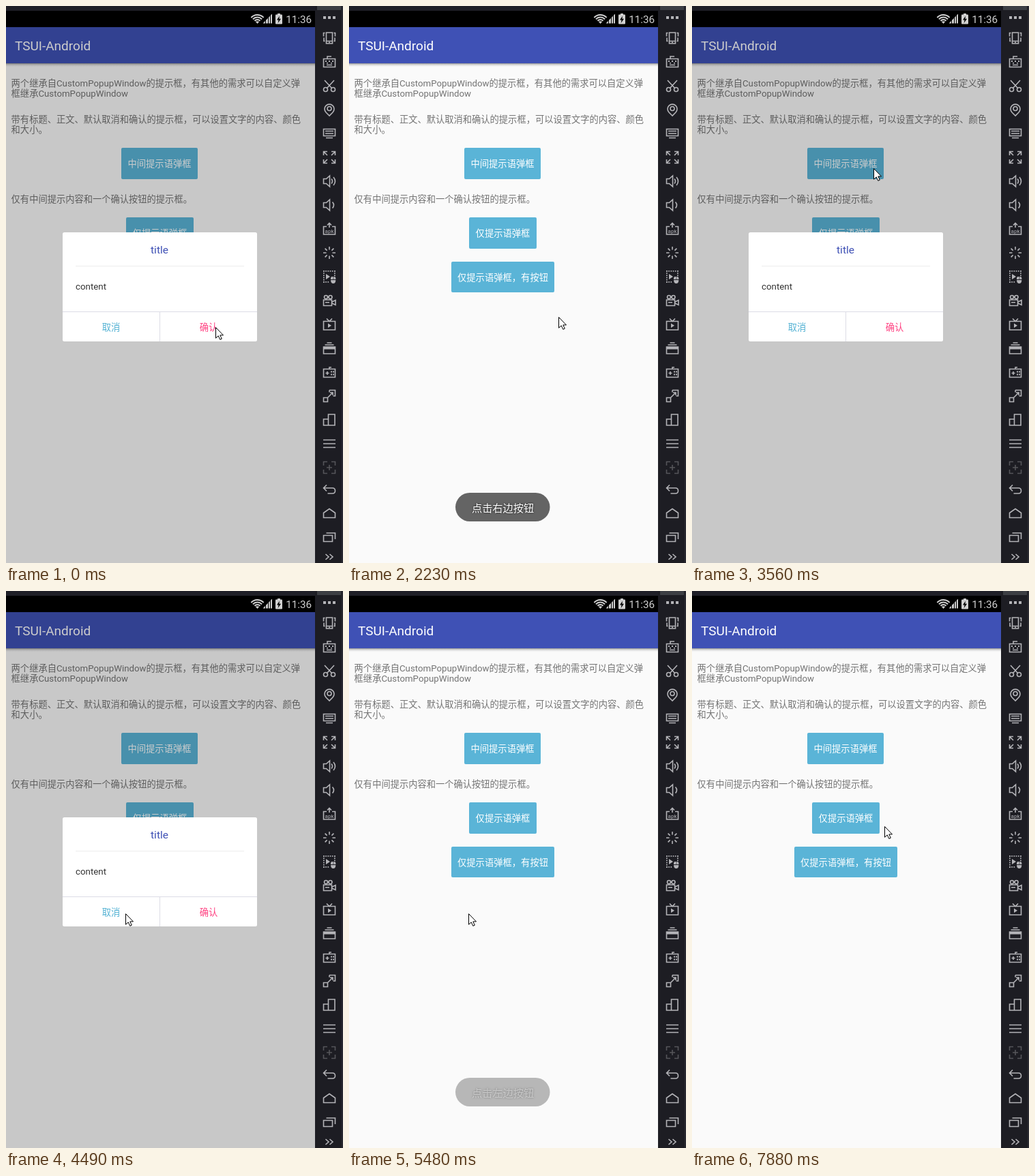
These frames come from a looping animation (494 px wide and 817 px high, 8000 ms). An HTML page with a canvas:

```html
<!DOCTYPE html>
<html lang="zh-CN">
<head>
<meta charset="utf-8">
<style>
html, body { margin: 0; width: 100%; height: 100%; overflow: hidden; background: #1d1d23; }
canvas { display: block; width: 494px; height: 817px; }
</style>
</head>
<body>
<canvas id="stage" width="494" height="817"></canvas>
<script>
const ctx = document.getElementById('stage').getContext('2d');
const LOOP = 8000;
const FONT = 'Roboto, "Noto Sans CJK SC", "Noto Sans CJK", sans-serif';
const ICON = '#b4b4b8';

// time, x, y of the pointer tip; each position holds until the next
const POINTER = [
  [0, 307, 471], [2230, 307, 456], [2350, 311, 400], [2470, 314, 354],
  [2620, 303, 285], [2770, 289, 262], [2890, 275, 246], [3010, 268, 240],
  [3130, 266, 238], [3830, 222, 330], [3950, 185, 404], [4100, 173, 446],
  [4220, 170, 465], [4370, 172, 470], [4490, 175, 473], [6980, 315, 435],
  [7100, 328, 395], [7220, 332, 362], [7370, 328, 356], [7490, 322, 350],
  [7610, 313, 347], [7730, 305, 345], [7880, 282, 345]
];
const DIM = [[0, 1], [910, 0], [3560, 1], [5360, 0]];
const DIALOG = [[0, 1], [910, 0], [3560, 1], [5230, 0]];
const TOASTS = [
  { text: '点击右边按钮', alpha: [[0, 0], [1060, .45], [1180, .82], [1300, 1], [2890, .94], [3010, .76], [3130, .42], [3290, 0]] },
  { text: '点击左边按钮', alpha: [[0, 0], [5480, .45], [5600, .82], [5740, 1], [7370, .94], [7490, .76], [7610, .42], [7730, 0]] }
];

function at(keys, t) {
  let hit = keys[0];
  for (const k of keys) if (k[0] <= t) hit = k;
  return hit;
}

function rect(x, y, w, h, color) {
  ctx.fillStyle = color;
  ctx.fillRect(x, y, w, h);
}

function round(x, y, w, h, r, color) {
  ctx.fillStyle = color;
  ctx.beginPath();
  ctx.roundRect(x, y, w, h, r);
  ctx.fill();
}

function text(s, x, y, size, color, align = 'left') {
  ctx.font = `${size}px ${FONT}`;
  ctx.textAlign = align;
  ctx.fillStyle = color;
  ctx.fillText(s, x, y);
}

function button(s, x, y, w, h) {
  round(x, y, w, h, 2, '#5ab4d7');
  text(s, x + w / 2, y + h / 2 + 5, 13.3, '#fff', 'center');
}

function drawStatusBar() {
  rect(0, 0, 494, 7, '#1f1f27');
  rect(0, 7, 453, 24, '#000');
  const c = '#d0d0d0';
  ctx.fillStyle = c;
  ctx.fill(new Path2D('M377 25.5V25L390 11.5V25.5Z'));
  rect(380, 11, 1, 15, '#000');
  rect(384, 11, 1, 15, '#000');
  rect(387, 11, 1, 15, '#000');
  ctx.strokeStyle = c;
  ctx.lineWidth = 2;
  for (const r of [5.5, 9, 12.5]) {
    ctx.beginPath();
    ctx.arc(368.5, 25.5, r, -Math.PI * .76, -Math.PI * .24);
    ctx.stroke();
  }
  ctx.fillStyle = c;
  ctx.fill(new Path2D('M368.5 26L365.8 23Q368.5 21.4 371.2 23Z'));
  rect(398, 11, 4, 2, c);
  round(395, 12.5, 10, 14, 1, c);
  ctx.fillStyle = '#000';
  ctx.fill(new Path2D('M401 14.5L397 20.5H399.5L398.7 25L403 18.7H400.4Z'));
  text('11:36', 448, 25, 15.2, c, 'right');
}

function drawPage() {
  rect(0, 31, 453, 786, '#fafafa');
  const shade = ctx.createLinearGradient(0, 84, 0, 89);
  shade.addColorStop(0, 'rgba(0,0,0,.42)');
  shade.addColorStop(.4, 'rgba(0,0,0,.14)');
  shade.addColorStop(1, 'rgba(0,0,0,0)');
  rect(0, 84, 453, 5, shade);
  rect(0, 31, 453, 53, '#3f51b5');
  text('TSUI-Android', 13, 65, 19, '#fff');

  const lines = [
    ['两个继承自CustomPopupWindow的提示框，有其他的需求可以自定义弹', 118],
    ['框继承CustomPopupWindow', 133],
    ['带有标题、正文、默认取消和确认的提示框，可以设置文字的内容、颜色', 171],
    ['和大小。', 186],
    ['仅有中间提示内容和一个确认按钮的提示框。', 288]
  ];
  for (const [s, y] of lines) text(s, 7.6, y, 13.28, '#737373');

  button('中间提示语弹框', 169, 208, 112, 46);
  button('仅提示语弹框', 176, 310, 99, 46);
  button('仅提示语弹框，有按钮', 150, 375, 151, 45);
}

function drawDialog() {
  round(83, 332, 285, 160, 2.5, '#fff');
  text('title', 225, 363, 15.5, '#3f51b5', 'center');
  rect(102, 381, 247, 1, '#ededed');
  text('content', 102, 416, 13.3, '#333');
  rect(83, 448, 285, 1, '#dcdce6');
  rect(225, 449, 1, 43, '#dcdce6');
  text('取消', 154, 475.5, 13.3, '#51b1d3', 'center');
  text('确认', 297, 475.5, 13.3, '#ff4081', 'center');
}

function drawToast(s, alpha) {
  ctx.save();
  ctx.globalAlpha = alpha;
  round(156, 714, 138.5, 42, 21, '#646464');
  ctx.shadowColor = 'rgba(0,0,0,.75)';
  ctx.shadowBlur = 3;
  text(s, 225.5, 742, 15.2, '#fff', 'center');
  ctx.restore();
}

const arrow = new Path2D('M.5 .5V16.2L4.2 12.8L6.8 18.3L9.3 17.2L6.8 11.9H11.5Z');
function drawPointer(x, y) {
  ctx.save();
  ctx.translate(x, y);
  ctx.fillStyle = '#fff';
  ctx.fill(arrow);
  ctx.strokeStyle = '#000';
  ctx.lineWidth = 1;
  ctx.stroke(arrow);
  ctx.restore();
}

// side bar icons around their own centre: y, stroked path, filled path, colour
const ICONS = [
  [17, '', 'M-9 -2h4v4h-4zM-2 -2h4v4h-4zM5 -2h4v4h-4z'],
  [47, 'M-4.5 -8h9v16h-9zM-4.5 4.5h9M-6.5 -7.5h-2v5M6.5 -7.5h2v5M-6.5 4.5h-1.5v-5M6.5 4.5h1.5v-5', 'M-1 5.5h2v1.5h-2z'],
  [82, 'M-8.5 -4.5h17v12h-17zM-3 -5v-3h6M-4 4.5h8', 'M-6 -2h2v2h-2zM-1 -2h2v2h-2zM4 -2h2v2h-2zM-4 1h2v1.5h-2zM2 1h2v1.5h-2z'],
  [117, 'M-7 -8L4 4M7 -8L-4 4M-2.5 5.5a3 3 0 1 1 -6 0a3 3 0 1 1 6 0M8.5 5.5a3 3 0 1 1 -6 0a3 3 0 1 1 6 0', ''],
  [152, 'M0 9L-5 4A7 7 0 1 1 5 4ZM3 -1.5a3 3 0 1 1 -6 0a3 3 0 1 1 6 0', ''],
  [187, 'M-8.5 -6.5h17v10h-17zM-6 -3.5h12M-6 0h12M-5 6.5h10', ''],
  [222, 'M-8.5 -3v-5.5h5.5M-8 -8l5 5M8.5 -3v-5.5h-5.5M8 -8l-5 5M-8.5 3v5.5h5.5M-8 8l5 -5M8.5 3v5.5h-5.5M8 8l-5 -5', ''],
  [257, 'M-8.5 -3.5h4l5 -4.5v16l-5 -4.5h-4zM3 -3.5q3 3.5 0 7M6 -6q5 6 0 12', ''],
  [292, 'M-8.5 -3.5h4l5 -4.5v16l-5 -4.5h-4zM4.5 -4.5q4 4.5 0 9', ''],
  [327, 'M-4 -3.5h-4.5v11.5h17v-11.5h-4.5M0 -2v-6M-3 -5.5l3 -3l3 3', ''],
  [362, 'M0 -9v4.5M0 9v-4.5M-9 0h4.5M9 0h-4.5M-6.4 -6.4l3 3M6.4 -6.4l-3 3M-6.4 6.4l3 -3M6.4 6.4l-3 -3', ''],
  [397, '', 'M-5 -4l6 4l-6 4zM3 0h2.7v4h-3.7v-2zM6.3 0h2l1 2v2h-3zM2 5h7.3q0 5 -3.6 5t-3.7 -5z'],
  [432, 'M-8.5 -1h12v8.5h-12zM4 2l5 -2.5v7l-5 -2.5M-2.5 -5a2.5 2.5 0 1 1 -5 0a2.5 2.5 0 1 1 5 0M4 -5a2.5 2.5 0 1 1 -5 0a2.5 2.5 0 1 1 5 0', 'M-6 2h6v1.5h-6z'],
  [467, 'M-8.5 -4.5h17v12.5h-17zM-4 -8.5l4 4l4 -4', 'M-2 -1.5l5 3.2l-5 3.3z'],
  [502, 'M-8.5 -2h17v10h-17zM-6.5 -5h13M-3.5 -8h7', 'M-8 -2h16v3.5h-16z'],
  [537, 'M-8.5 -4.5h17v12h-17zM0 -4.5v-2.5h3M-5.5 1.5h5M-3 -1v5', 'M2 -1.5h2v2h-2zM5 -1.5h2v2h-2zM2 2.5h2v2h-2zM5 2.5h2v2h-2z'],
  [572, 'M0 -8.5h8.5v8.5h-3M0 -8.5v3M-8.5 2.5h6v6h-6zM-3 3l8 -8M1 -5h4v4', ''],
  [607, 'M-8.5 -1h7v9h-7zM-1.5 -8h9.5v16h-9.5z', ''],
  [642, 'M-9 -5.5h18M-9 0h18M-9 5.5h18', ''],
  [677, 'M-8.5 -3v-5.5h5.5M8.5 -3v-5.5h-5.5M-8.5 3v5.5h5.5M8.5 3v5.5h-5.5M-4 0h8M0 -4v8', '', '#55555a'],
  [709, 'M-4 -6.5l-4.5 4.5l4.5 4.5M-8 -2h12.5q4 0 4 4t-4 4h-7', ''],
  [744, 'M-8.5 6.5v-7l8.5 -6l8.5 6v7z', ''],
  [779, 'M-8.5 -2.5h13v9h-13zM-4.5 -6h13v9', ''],
  [808, 'M-5.5 -4l4.5 4l-4.5 4M.5 -4l4.5 4l-4.5 4', '']
].map(([y, line, fill, color = ICON]) => ({ y, line: new Path2D(line), fill: new Path2D(fill), color }));

function drawSideBar() {
  rect(453, 0, 41, 817, '#1d1d23');
  rect(456, 0, 35, 6, '#3d3f44');
  rect(492, 0, 2, 817, '#2a2a31');
  ctx.lineWidth = 1.6;
  for (const icon of ICONS) {
    ctx.save();
    ctx.translate(474, icon.y);
    ctx.strokeStyle = ctx.fillStyle = icon.color;
    ctx.stroke(icon.line);
    ctx.fill(icon.fill);
    ctx.restore();
  }
  text('apk', 474, 333, 8, ICON, 'center');
  for (let i = 0; i < 6; i++) {
    const d = i * 3.2;
    rect(465 + d, 388, 1.7, 1.7, ICON);
    rect(465, 388 + d, 1.7, 1.7, ICON);
    if (i < 3) {
      rect(481, 388 + d, 1.7, 1.7, ICON);
      rect(465 + d, 404, 1.7, 1.7, ICON);
    }
  }
}

function frame() {
  const t = performance.now() % LOOP;
  drawStatusBar();
  drawPage();
  if (at(DIM, t)[1]) rect(0, 31, 453, 786, 'rgba(0,0,0,.2)');
  if (at(DIALOG, t)[1]) drawDialog();
  for (const toast of TOASTS) {
    const alpha = at(toast.alpha, t)[1];
    if (alpha) drawToast(toast.text, alpha);
  }
  drawSideBar();
  const [, x, y] = at(POINTER, t);
  drawPointer(x, y);
  requestAnimationFrame(frame);
}
frame();
</script>
</body>
</html>
```
